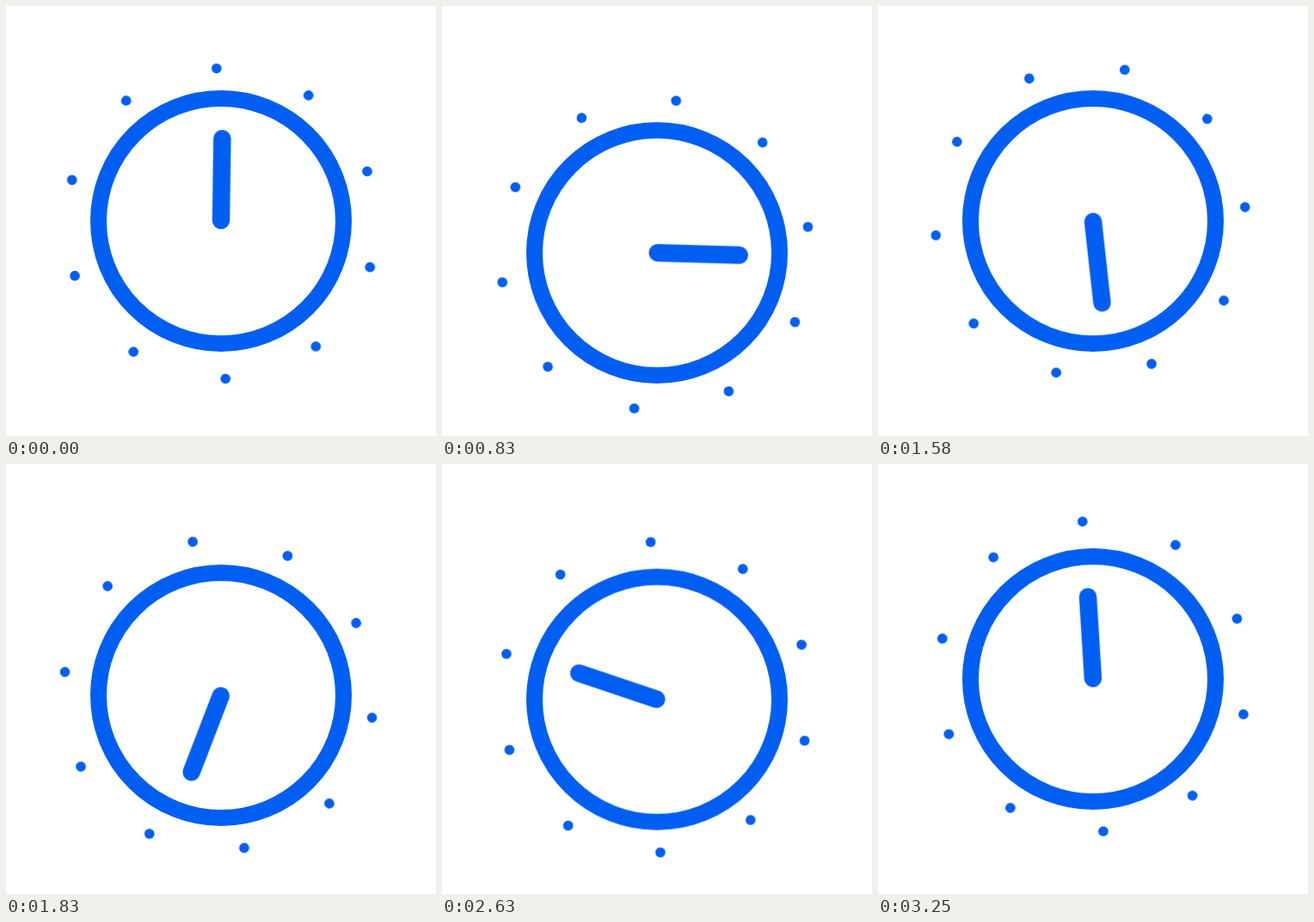
An HTML page for the animation above (3.29 s loop, 500 by 500 pixels).

```html
<!DOCTYPE html>
<html lang="en">
<head>
<meta charset="utf-8">
<title>Bouncing clock</title>
<style>
  :root { --loop: 3290ms; }
  html, body { margin: 0; width: 100%; height: 100%; overflow: hidden; background: #fff; }
  svg { display: block; width: 100vw; height: 100vh; fill: none; stroke: #005ff2; stroke-linecap: round; }

  .clock { animation: bounce var(--loop) cubic-bezier(.27, 0, 0, 1) infinite; }
  .dots, .hand { transform-origin: 250px 250px; }
  .dots { animation: half-turn var(--loop) linear infinite; }
  .hand { animation: full-turn var(--loop) linear infinite; }

  /* The easing applies to each leg: a quick move, then a long settle */
  @keyframes bounce {
    0%, 49.7%, 100% { transform: translateY(0); }
    25%, 75.5% { transform: translateY(37px); }
  }
  /* Ten dots repeat every 36deg, so half a turn closes the loop */
  @keyframes half-turn { to { transform: rotate(180deg); } }
  @keyframes full-turn {
    from { transform: rotate(.7deg); }
    to { transform: rotate(360.7deg); }
  }
</style>
</head>
<body>
<svg viewBox="0 0 500 500">
  <g class="clock">
    <circle cx="250" cy="250" r="142.5" stroke-width="19"/>
    <g class="dots">
      <!-- Sits slightly off the pivot, so the ring of dots wobbles -->
      <circle cx="250" cy="253" r="180.5" stroke-width="11.6"
              pathLength="10" stroke-dasharray=".001 .999"
              transform="rotate(-91.75 250 253)"/>
    </g>
    <path class="hand" d="M250 249.25V154.25" stroke-width="20.5"/>
  </g>
</svg>
</body>
</html>
```
